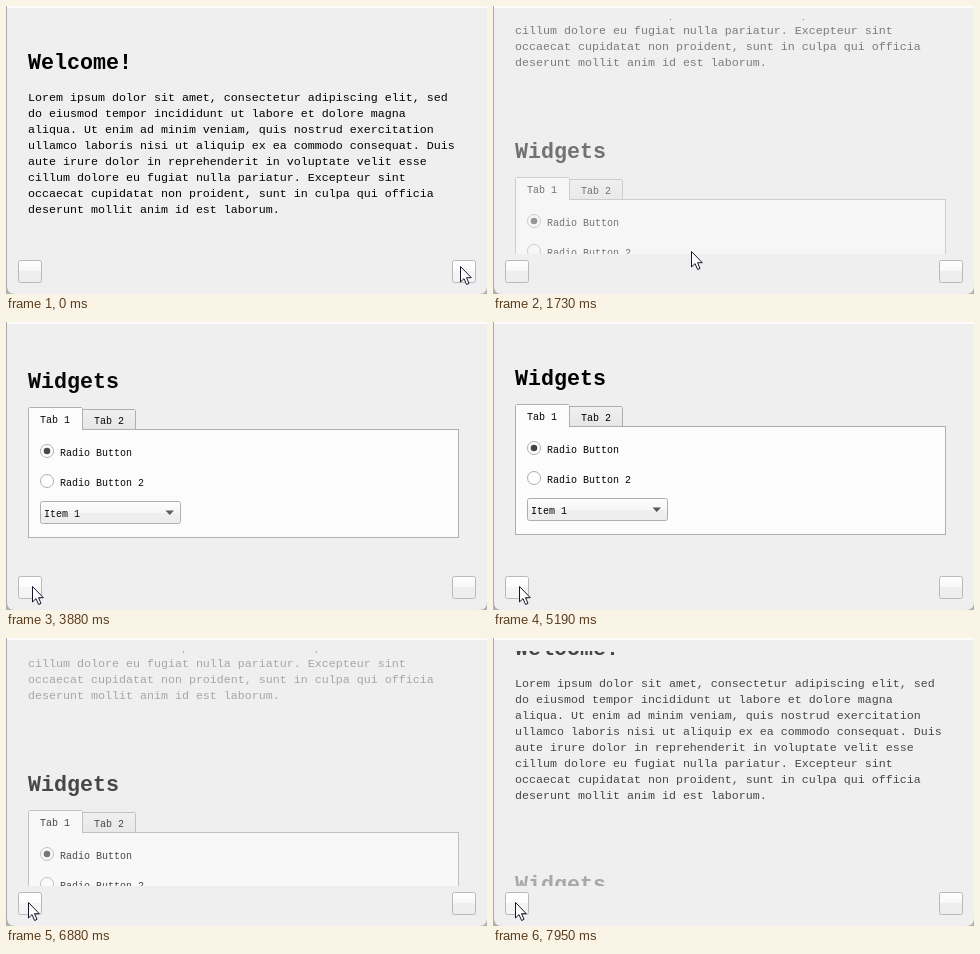
Recreate the animation shown at these times as an HTML page. Size 481 by 288 pixels, loop 8000 ms.

```html
<!DOCTYPE html>
<html lang="en">
<head>
<meta charset="utf-8">
<title>Sliding pages</title>
<style>
  html, body { margin: 0; width: 100%; height: 100%; overflow: hidden; background: #b0b0b0; }
  svg { display: block; width: 481px; height: 288px; }
  text { font-family: "Liberation Mono", "Courier New", monospace; fill: #000; white-space: pre; }
  .title { font-size: 21.667px; font-weight: 700; }
  .body { font-size: 11.667px; }
  .small { font-size: 10px; }
  .line { stroke: #aeaeae; }
  .button { fill: url(#face); stroke: #b9b9b9; }
  .hover { fill: url(#lit); }
  .pressed { fill: #e2e2e2; }
</style>
</head>
<body>
<svg viewBox="0 0 481 288">
  <defs>
    <clipPath id="view"><rect x="22" y="13" width="431" height="235"/></clipPath>
    <linearGradient id="face" x2="0" y2="1">
      <stop stop-color="#fff"/><stop offset=".5" stop-color="#f7f7f7"/>
      <stop offset=".5" stop-color="#efefef"/><stop offset="1" stop-color="#ededed"/>
    </linearGradient>
    <linearGradient id="lit" x2="0" y2="1">
      <stop stop-color="#fff"/><stop offset=".5" stop-color="#fcfcfc"/>
      <stop offset=".5" stop-color="#f5f5f5"/><stop offset="1" stop-color="#f3f3f3"/>
    </linearGradient>
    <linearGradient id="tab" x2="0" y2="1">
      <stop stop-color="#f0f0f0"/><stop offset="1" stop-color="#e6e6e6"/>
    </linearGradient>
  </defs>

  <path d="M.5 0V280Q.5 288.5 9 288.5H473Q481.5 288.5 481.5 280V0Z" fill="#efefef" stroke="#a8a8a8"/>
  <path d="M1 0H481V2H1Z" fill="#fcfcfc"/>

  <g clip-path="url(#view)">
    <g id="scroll">
      <g id="welcome"><text class="title" x="22" y="63">Welcome!</text></g>
      <g id="widgets">
        <g transform="translate(0 236)">
          <text class="title" x="22" y="63">Widgets</text>
          <path class="line" d="M76.5 104V84.5H128.5L129.5 85.5V104" fill="url(#tab)"/>
          <rect class="line" x="22.5" y="104.5" width="430" height="108" fill="#fdfdfd"/>
          <path class="line" d="M22.5 105V83.5L23.5 82.5H75.5L76.5 83.5V105" fill="#fdfdfd"/>
          <path d="M23 104H76V106H23Z" fill="#fdfdfd"/>
          <text class="small" x="34" y="98">Tab 1</text>
          <text class="small" x="88" y="99">Tab 2</text>
          <circle class="line" cx="41" cy="126" r="6.5" fill="#fff"/>
          <circle cx="41" cy="126" r="3.3" fill="#444"/>
          <text class="small" x="54" y="131">Radio Button</text>
          <circle class="line" cx="41" cy="156" r="6.5" fill="#fff"/>
          <text class="small" x="54" y="161">Radio Button 2</text>
          <rect class="line" x="34.5" y="176.5" width="140" height="22" rx="2" fill="url(#face)"/>
          <text class="small" x="38" y="192">Item 1</text>
          <path d="M159.5 185.5H168L163.75 190Z" fill="#555"/>
        </g>
      </g>
    </g>
  </g>

  <rect id="back" class="button" x="12.5" y="254.5" width="23" height="22" rx="2"/>
  <rect id="next" class="button" x="446.5" y="254.5" width="23" height="22" rx="2"/>
  <path id="cursor" d="M.5 .5V16L4 12.6L6.6 18.5L9 17.4L6.5 11.7H11.3Z" fill="#fff" stroke="#15152a"/>
</svg>
<script>
  const LOOP = 8000, PAGE = 236, SLIDE = 4820;
  const FORWARD = 687, BACKWARD = 6336;
  const el = id => document.getElementById(id);

  const lorem = [
    "Lorem ipsum dolor sit amet, consectetur adipiscing elit, sed",
    "do eiusmod tempor incididunt ut labore et dolore magna",
    "aliqua. Ut enim ad minim veniam, quis nostrud exercitation",
    "ullamco laboris nisi ut aliquip ex ea commodo consequat. Duis",
    "aute irure dolor in reprehenderit in voluptate velit esse",
    "cillum dolore eu fugiat nulla pariatur. Excepteur sint",
    "occaecat cupidatat non proident, sunt in culpa qui officia",
    "deserunt mollit anim id est laborum."
  ];
  lorem.forEach((words, i) => {
    const text = document.createElementNS("http://www.w3.org/2000/svg", "text");
    text.setAttribute("class", "body");
    text.setAttribute("x", 22);
    text.setAttribute("y", 95 + 16 * i);
    text.textContent = words;
    el("welcome").append(text);
  });

  // The picture refreshes in steps: [first, last, count]
  const ticks = [
    [0, 0, 1], [400, 400, 1], [810, 950, 2], [1110, 1470, 4], [1610, 1980, 4],
    [2130, 2130, 1], [2270, 2640, 4], [2780, 3380, 6], [3520, 4000, 5],
    [4140, 4520, 2], [5590, 5870, 2], [6370, 6370, 1], [6520, 7000, 5],
    [7140, 7140, 1], [7300, 7420, 2], [7560, 7560, 1], [7710, 7950, 3]
  ].flatMap(([a, b, n]) =>
    Array.from({ length: n }, (_, i) => n > 1 ? Math.floor((a + (b - a) * i / (n - 1)) / 10) * 10 : a));

  // Pointer places: [time, x, y]
  const places = [
    [0, 454, 260], [1610, 365, 257], [1730, 198, 245], [1850, 105, 244],
    [1980, 64, 246], [2130, 44, 252], [2270, 32, 260], [2390, 26, 264], [5870, 22, 264]
  ];

  const clamp = v => Math.min(1, Math.max(0, v));
  const easeOut = (v, power) => 1 - (1 - v) ** power;

  function setButton(id, hover, pressed) {
    el(id).setAttribute("class", "button" + (pressed ? " pressed" : hover ? " hover" : ""));
  }

  function draw(time) {
    const t = ticks.findLast(tick => tick <= time);
    const back = t >= BACKWARD;
    const raw = clamp((t - (back ? BACKWARD : FORWARD)) / SLIDE);
    const along = power => back ? 1 - easeOut(raw, power) : easeOut(raw, power);
    const fade = along(3);
    el("scroll").setAttribute("transform", `translate(0 ${-Math.round(PAGE * along(4))})`);
    el("welcome").setAttribute("opacity", 1 - fade);
    el("widgets").setAttribute("opacity", fade);

    const [, x, y] = places.findLast(place => place[0] <= t);
    el("cursor").setAttribute("transform", `translate(${x} ${y})`);
    setButton("next", x > 446, t >= 400 && t < 810);
    setButton("back", x < 36 && y > 254, t >= 5590 && t < 6370);
  }

  const start = performance.now();
  function frame() {
    draw((performance.now() - start) % LOOP);
    requestAnimationFrame(frame);
  }
  frame();
</script>
</body>
</html>
```
